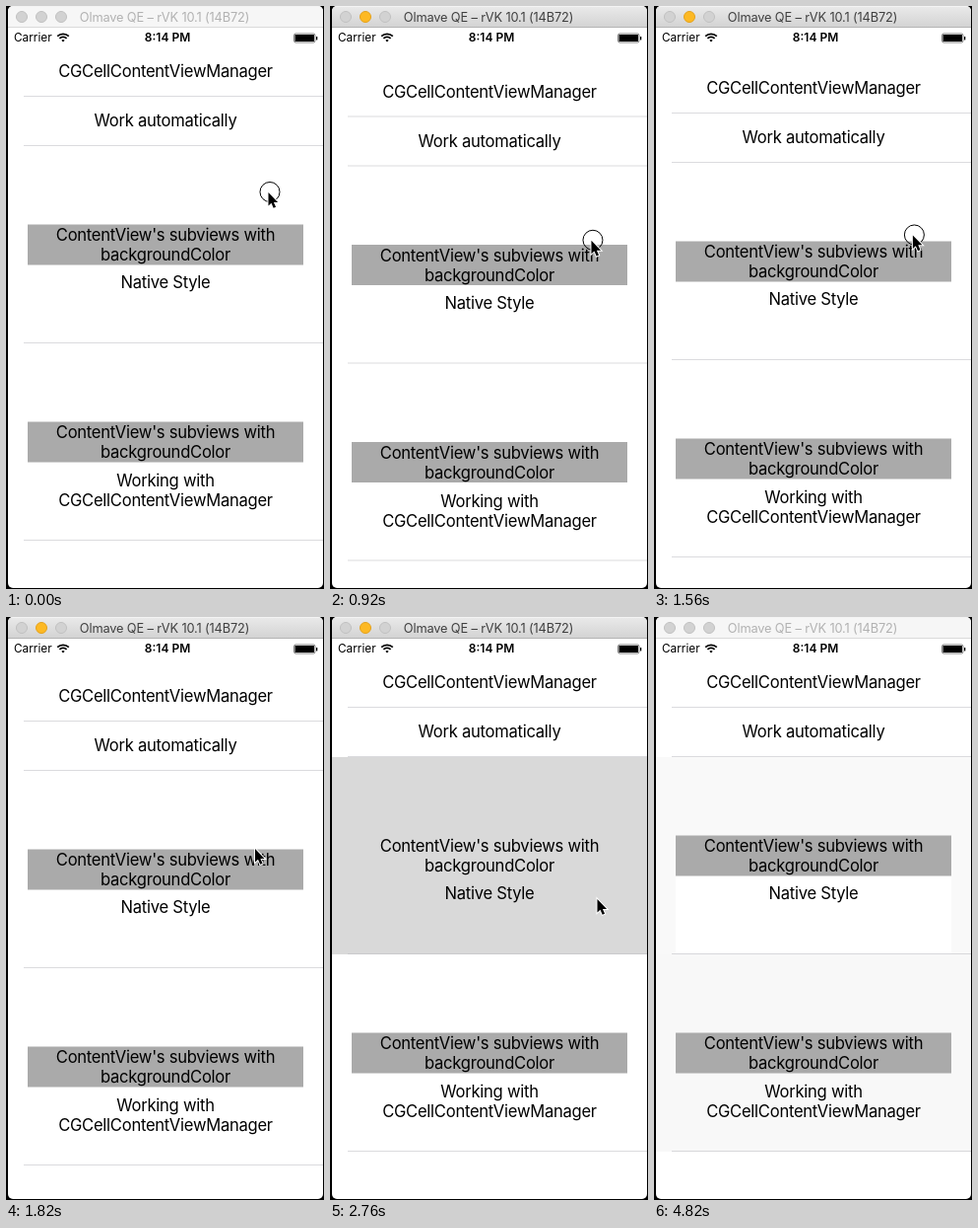
An HTML page with a canvas that plays this animation: 323x591 px, repeating every 4860 ms.

```html
<!DOCTYPE html>
<html lang="en">
<head>
<meta charset="utf-8">
<title>Table cell highlight</title>
<style>
  html, body { margin: 0; width: 323px; height: 591px; overflow: hidden; background: #000; }
  canvas { display: block; }
</style>
</head>
<body>
<canvas id="stage" width="323" height="591"></canvas>
<script>
const ctx = document.getElementById('stage').getContext('2d');
const LOOP = 4860;
const PRESS = 460, RELEASE = 1700;
const FAMILY = 'Inter, Roboto, sans-serif';

// Pointer tip: time, x, y
const POINTER = [
  [0, 266.5, 189], [250, 266.5, 189], [290, 268, 190], [PRESS, 268, 190],
  [620, 265, 222], [980, 265.5, 239], [1200, 266, 246.5], [1420, 265, 212],
  [1640, 262, 241], [RELEASE, 260, 241], [1820, 253, 235], [2110, 257, 248],
  [2640, 271.5, 286], [2930, 271.5, 286], [3430, 278, 384], [3460, 279, 384],
  [4140, 279, 384], [4370, 304, 594]
];

const clamp = v => Math.min(1, Math.max(0, v));
const smooth = v => v * v * (3 - 2 * v);
const mix = (a, b, k) => a + (b - a) * k;

function pointerAt(t) {
  const next = POINTER.findIndex(key => key[0] > t);
  if (next < 0) return POINTER.at(-1).slice(1);
  const [t0, x0, y0] = POINTER[next - 1], [t1, x1, y1] = POINTER[next];
  const k = smooth((t - t0) / (t1 - t0));
  return [mix(x0, x1, k), mix(y0, y1, k)];
}

// Rubber-band pull while pressed, critically damped return afterwards, in half pixels
function pullAt(t) {
  if (t < PRESS) return 0;
  const pull = Math.max(0, 0.633 * (pointerAt(Math.min(t, RELEASE))[1] - 205.4));
  const s = Math.max(0, t - RELEASE) * 0.0109;
  return Math.round(2 * pull * (1 + s) * Math.exp(-s)) / 2;
}

function rect(x, y, w, h, color) {
  ctx.fillStyle = color;
  ctx.fillRect(x, y, w, h);
}

function text(str, x, y, { size = 16.6, weight = 400, color = '#000', align = 'center', spacing = -0.27 } = {}) {
  ctx.font = `${weight} ${size}px ${FAMILY}`;
  ctx.letterSpacing = spacing + 'px';
  ctx.textAlign = align;
  ctx.fillStyle = color;
  ctx.fillText(str, x, y);
}

function circle(x, y, r, fill, stroke) {
  ctx.beginPath();
  ctx.arc(x, y, r, 0, 7);
  if (fill) { ctx.fillStyle = fill; ctx.fill(); }
  ctx.strokeStyle = stroke;
  ctx.lineWidth = 1;
  ctx.stroke();
}

function titleBar(active) {
  const shade = ctx.createLinearGradient(0, 1, 0, 22);
  shade.addColorStop(0, active ? '#e9e9e9' : '#f6f6f6');
  shade.addColorStop(1, active ? '#d2d2d2' : '#f6f6f6');
  rect(2, 0, 320, 1, '#f4f4f4');
  rect(2, 1, 320, 21, shade);
  rect(2, 21, 320, 1, active ? '#b4b4b4' : '#dadada');
  [16, 36, 56].forEach((x, i) => {
    const lit = active && i === 1;
    circle(x, 11, 5.5, lit ? '#fdb924' : '#d2d2d2', lit ? '#e3a11c' : '#c0c0c0');
  });
  text('Olmave QE – rVK 10.1 (14B72)', 161, 16, { size: 12.8, color: active ? '#404040' : '#b2b2b2', spacing: -0.15 });
}

function statusBar() {
  text('Carrier', 8, 36, { size: 11.8, align: 'left', spacing: 0 });
  text('8:14 PM', 164, 36, { size: 12, weight: 600, spacing: 0 });
  ctx.strokeStyle = '#000';
  ctx.lineWidth = 1.8;
  for (const r of [8.2, 5.1, 1.4]) {
    ctx.beginPath();
    ctx.arc(58, 36.5, r, -Math.PI * 0.75, -Math.PI * 0.25);
    ctx.stroke();
  }
  ctx.lineWidth = 0.5;
  ctx.beginPath();
  ctx.roundRect(292.5, 28, 21.5, 9, 1.8);
  ctx.stroke();
  rect(293.5, 29, 19.5, 7, '#000');
  rect(315, 31, 1.3, 3.4, '#000');
}

// Cell background after a tap: held, then faded to a faint rest shade
function cellTint(t, y, on, fadeStart, fadeEnd, rest) {
  if (t < on) return;
  const level = Math.round(mix(217, rest, smooth(clamp((t - fadeStart) / (fadeEnd - fadeStart)))));
  rect(2, y, 320, 200, `rgb(${level},${level},${level})`);
}

function banner(y, filled) {
  if (filled) rect(22, y - 16.5, 280, 41, '#aaa');
  text("ContentView's subviews with", 162, y);
  text('backgroundColor', 162, y + 20);
}

function table(t) {
  const restored = t >= 3430;
  ctx.save();
  ctx.translate(0, pullAt(t));
  cellTint(t, 142, 2760, 2930, 3430, 249);
  cellTint(t, 342, 3610, 3720, 4130, 248);
  if (restored) rect(22, 262, 280, 79, '#fff');
  for (const y of [91, 141, 341, 541]) rect(18, y, 304, 1, 'rgba(190,190,196,0.55)');
  text('CGCellContentViewManager', 162, 72);
  text('Work automatically', 162, 122);
  banner(238, t < 2760 || restored);
  text('Native Style', 162, 286);
  banner(438, true);
  text('Working with', 162, 487);
  text('CGCellContentViewManager', 162, 507);
  ctx.restore();
}

function pointer(t) {
  if (t >= 4370) return;
  const [x, y] = pointerAt(t);
  if (t < 30 || (t >= PRESS && t < RELEASE)) circle(x + 1.5, y - 0.5, 10, null, '#000');
  const arrow = new Path2D('M0 0V13.5L3 10.8L5.2 15.8L7.6 14.8L5.4 9.9H9.6Z');
  ctx.save();
  ctx.translate(x, y);
  ctx.strokeStyle = '#fff';
  ctx.lineWidth = 2;
  ctx.stroke(arrow);
  ctx.fillStyle = '#000';
  ctx.fill(arrow);
  ctx.restore();
}

function draw(now) {
  const t = now % LOOP;
  rect(0, 0, 323, 591, '#000');
  ctx.save();
  ctx.beginPath();
  ctx.roundRect(2, 0, 320, 590, 5);
  ctx.clip();
  rect(2, 0, 320, 590, '#fff');
  table(t);
  titleBar(t >= PRESS && t < 4820);
  statusBar();
  pointer(t);
  ctx.restore();
}

const start = performance.now();
function frame() {
  draw(performance.now() - start);
  requestAnimationFrame(frame);
}
frame();
</script>
</body>
</html>
```
